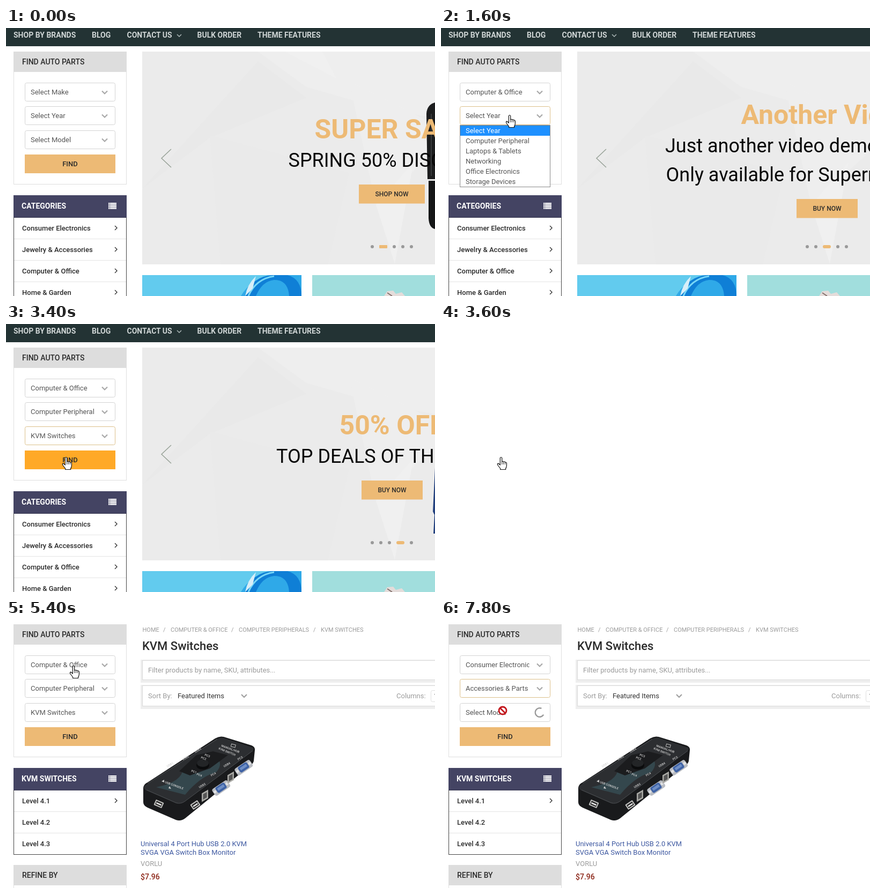
Recreate the animation shown at these times as an HTML page. Size 800x500 px, loop 8 s.

```html
<!DOCTYPE html>
<html lang="en">
<head>
<meta charset="utf-8">
<title>Parts finder</title>
<style>
html, body { margin: 0; width: 100%; height: 100%; overflow: hidden; background: #fff; }
svg { display: block; width: 800px; height: 500px; font-family: Roboto, Arial, sans-serif; }
text { white-space: pre; }
</style>
</head>
<body>
<svg id="stage" viewBox="0 0 800 500"></svg>
<script>
const ORANGE = '#edba75', DARK = '#2b2b2b', GREY = '#9b9b9b';
const FIELD_TOPS = [102, 146, 191];
const STEP = 200, LOOP = 8000;

const text = (x, y, str, size = 13, fill = DARK, weight = 400, extra = '') =>
  `<text x="${x}" y="${y}" font-size="${size}" fill="${fill}" font-weight="${weight}" ${extra}>${str.replace(/&/g, '&amp;')}</text>`;
const rect = (x, y, w, h, fill, extra = '') =>
  `<rect x="${x}" y="${y}" width="${w}" height="${h}" fill="${fill}" ${extra}/>`;
const line = (d, stroke, width = 1) =>
  `<path d="${d}" fill="none" stroke="${stroke}" stroke-width="${width}"/>`;
const shape = (d, fill, extra = '') => `<path d="${d}" fill="${fill}" ${extra}/>`;
const group = (transform, body) => `<g transform="${transform}">${body}</g>`;
const times = (n, fn) => Array.from({ length: n }, (_, i) => fn(i)).join('');

const CATEGORIES = ['Consumer Electronics', 'Jewelry & Accessories', 'Computer & Office', 'Home & Garden'];
const LISTS = {
  make: ['Select Make', ...CATEGORIES, 'Bags & Shoes', 'Toys & Hobbies', 'Sports & Outdoors', 'Health & Beauty'],
  office: ['Select Year', 'Computer Peripheral', 'Laptops & Tablets', 'Networking', 'Office Electronics', 'Storage Devices'],
  peripheral: ['Select Model', 'KVM Switches', 'Keyboards', 'Monitors'],
  consumer: ['Select Year', 'Accessories & Parts', 'Camera & Photo', 'Home Audio & Video', 'Portable Audio & Video',
    'Smart Electronics', 'Video Games', 'Earphones', 'Speakers']
};

// ---------- sidebar ----------
function finder(s) {
  const fields = times(3, i => {
    const y = FIELD_TOPS[i], label = s.values[i], spin = s.spin && s.spin[0] === i;
    const end = spin
      ? `<circle cx="184" cy="${y + 17.5}" r="8.3" fill="none" stroke="#999" stroke-width="2.4" stroke-dasharray="38 14.2" transform="rotate(${s.spin[1]} 184 ${y + 17.5})"/>`
      : line(`M179 ${y + 15.5}l5 5 5-5`, '#a8a8a8', 2.2);
    return rect(35.5, y + .5, 168, 34, '#fff', `rx="3" stroke="${s.focus === i ? '#dcc08a' : '#d3d3d3'}"`) +
      text(46, y + 22, label, 13, '#555', 400, 'clip-path="url(#field)"') + end;
  });
  return rect(14.5, 44.5, 210, 247, '#fff', 'stroke="#dedede"') +
    rect(14, 44, 211, 38, '#ddd') + text(30, 68, 'FIND AUTO PARTS', 14, DARK, 500) + fields +
    rect(35, 236, 169, 35, s.hover ? '#ffa927' : ORANGE) +
    text(119.5, 258, 'FIND', 13, DARK, 500, 'text-anchor="middle"');
}

function menu(title, items, arrows, height) {
  return rect(14.5, 312.5, 210, height, '#fff', 'stroke="#444"') +
    rect(14, 312, 211, 42, '#444463') + line('M14 353.5H225', '#36364f') +
    text(29, 337, title, 14, '#fff', 700) +
    times(4, i => rect(191, 326 + i * 3.1, 2.5, 2.4, '#fff') + rect(194, 326 + i * 3.1, 12, 2.4, '#fff')) +
    items.map((item, i) => {
      const y = 373 + i * 40;
      return (i ? line(`M15 ${y - 19.5}H224`, '#e4e4e4') : '') + text(30, y + 5, item, 13, DARK, 500) +
        (i < arrows ? line(`M203 ${y - 4}l4 4-4 4`, '#333', 1.4) : '');
    }).join('');
}

function dropdown({ field, list, pick }) {
  const items = LISTS[list], top = FIELD_TOPS[field] + 35, wide = list === 'consumer' ? 186 : 169;
  return rect(35.5, top + .5, wide - 1, items.length * 19 + 1, '#fff', 'stroke="#888"') +
    items.map((item, i) => {
      const y = top + 1 + i * 19;
      return (i === pick ? rect(36, y, wide - 2, 19, '#1e90ff') : '') +
        text(46, y + 14, item, 13, i === pick ? '#fff' : '#555');
    }).join('');
}

// ---------- home page ----------
const SLIDES = {
  1: {
    art: shape('M800 139Q785 143 784 160L786 282H800Z', '#1c1d1e') + shape('M800 285H788V355Q789 373 800 375Z', '#151617') +
      line('M793 160V276', '#3a3c3d', 2),
    lines: [[575.5, 206, 'SUPER SALE'], [526.5, 259, 'SPRING 50% DISCOUNT']],
    button: [658, 292, 123, 'SHOP NOW']
  },
  2: {
    art: '',
    lines: [[559.5, 179, 'Another Video'], [418, 232, 'Just another video demo'], [419.5, 286, 'Only available for Superm']],
    button: [663, 319, 114, 'BUY NOW']
  },
  3: {
    art: shape('M800 268L796 350 799 356 797 391H800Z', '#24427f'),
    lines: [[621.5, 206, '50% OFF'], [504, 259, 'TOP DEALS OF THE']],
    button: [663, 292, 114, 'BUY NOW']
  }
};

function banner(active) {
  const { art, lines, button: [bx, by, bw, label] } = SLIDES[active];
  const facets = shape('M470 44H800V168L700 150 560 110Z', '#eeeeee') +
    shape('M254 300L470 62 560 130 380 205Z', '#e9e9e9') +
    shape('M640 100L800 180V230L690 330Z', '#eeeeee') + shape('M690 330L760 250 725 440Z', '#f0f0f0') +
    shape('M380 200L640 270 600 441H400Z', '#eaeaea') +
    (active === 1 ? shape('M520 44H590L616 94Z', '#f0f0f0') : '');
  const dots = times(5, i => i === active
    ? rect(680 + 16 * i, 405, 15, 6, ORANGE, `rx="${active === 1 ? 1 : 3}"`)
    : `<circle cx="${(i < active ? 683 : 692) + 16 * i}" cy="408" r="3" fill="#999"/>`);
  return rect(254, 44, 546, 397, '#ebebeb') + facets + art +
    lines.map(([x, y, str], i) => text(x, y, str, i ? 36 : 50, i ? '#080808' : ORANGE, i ? 400 : 700)).join('') +
    rect(bx, by, bw, 35.5, ORANGE) +
    text(bx + bw / 2, by + 22, label, 12, DARK, 500, 'text-anchor="middle"') +
    dots + line('M308 226L290 243 308 260', '#98a298', 1.5);
}

const NAV = [[14, 'SHOP BY BRANDS'], [160, 'BLOG'], [225.5, 'CONTACT US'], [356.5, 'BULK ORDER'], [469, 'THEME FEATURES']];
const homeStatic =
  rect(0, 0, 800, 34, '#233334') + NAV.map(([x, str]) => text(x, 18, str, 14, '#cfd5d5', 700)).join('') +
  line('M319 12l4 4 4-4', '#aebaba', 1.5) +
  menu('CATEGORIES', CATEGORIES, 4, 220) +
  rect(254, 461, 297, 39, '#62cbee') +
  shape('M438 500Q458 466 500 461H551V500Z', '#2fa9e8') +
  shape('M446 500Q459 463 497 461H525Q551 468 551 500H528Q526 470 500 470 478 472 466 500Z', '#0f7fd6') +
  line('M452 500Q466 468 500 463', '#78d7f7', 3) + shape('M446 500Q450 478 466 463L460 486Z', '#d8eef8') +
  rect(571, 461, 229, 39, '#a1dedd') +
  shape('M705 500L711 491 722 490 727 496 738 493 744 500Z', '#e4dcda') + line('M711 494l9 6', '#84706c', 2);

// ---------- product page ----------
function port(x, y) {
  return group(`translate(${x} ${y}) rotate(-34)`,
    rect(-17, -7, 34, 15, '#b9bcc2', 'rx="4"') + rect(-10, -6, 20, 12, '#3e62a5', 'rx="3"') +
    rect(-7, -3, 14, 5, '#6f8fc6') +
    `<circle cx="-13.5" r="2.6" fill="#e2e3e5"/><circle cx="13.5" r="2.6" fill="#e2e3e5"/>`);
}
const usb = (x, y, angle) => group(`translate(${x} ${y}) rotate(${angle})`,
  rect(-8, -5.5, 16, 11, '#c2c2c0', 'rx="1"') + rect(-6, -3.5, 12, 7, '#262626') + rect(-5, -1, 10, 2.5, '#e8e8e8'));
const jack = (x, y) => group(`translate(${x} ${y}) skewY(-30)`,
  rect(-6, -8, 12, 16, '#a9a9a5') + rect(-3.5, -5, 7, 10, '#555'));
const tiny = (x, y, str, angle = 20) =>
  text(0, 0, str, 5.5, '#d4d4d4', 500, `transform="translate(${x} ${y}) rotate(${angle})"`);

const gadget =
  shape('M256 313Q257 306 264 303L390 221Q398 216 406 218L458 234Q465 237 464 243L462 263Q461 268 456 271L334 370Q326 376 317 373L264 350Q256 346 256 340Z', '#191a1c') +
  shape('M259 309L392 223Q399 218 406 220L460 238Q464 241 459 245L334 338Q326 344 317 342L262 318Q254 314 259 309Z', '#2c2e31') +
  shape('M280 312Q330 302 330 276 350 260 388 252 408 266 392 284 362 292 334 326Z', '#34474d') +
  shape('M323 282L355 252 386 245 414 252 380 277 343 290Z', '#1b1c1e') +
  line('M262 317L317 341Q326 344 334 338L460 244', '#4b4e51') +
  line('M264 305L394 222', '#505356') +
  '<ellipse cx="367" cy="271" rx="12" ry="8" fill="#0b0c0d"/><ellipse cx="367" cy="267" rx="11" ry="7" fill="#232527"/>' +
  tiny(401, 236, 'MANUAL/HUB') + tiny(396, 241, 'KVM SWITCH', 22) +
  rect(420, 232, 8, 5, 'none', 'stroke="#bbb" transform="rotate(15 424 234)"') +
  tiny(370, 253, 'PC3') + tiny(363, 258, 'PC2') + tiny(345, 283, 'PC1') + tiny(355, 289, 'PC4') +
  tiny(301, 275, 'USB1', -30) + tiny(330, 262, 'USB2', -30) + tiny(353, 248, 'USB3', -30) +
  tiny(296, 304, 'USB CONSOLE', 20) + shape('M290 301l5-3v5Z', '#ccc') + shape('M303 314l5 1-3-5Z', '#ccc') +
  tiny(383, 292, 'PC4', -30) + tiny(407, 275, 'USB4', -30) + tiny(433, 262, 'PC3', -30) + tiny(361, 314, 'USB3', -30) +
  jack(371, 328) + port(401, 313) + jack(419, 294) + port(443, 275) + usb(353, 345, -34) + usb(285, 343, 24);

const panel = (y, h) => rect(251, y - 1, 549, h + 6, '#eeeeee') + rect(254.5, y + .5, 550, h - 1, '#fff', 'stroke="#d9d9d9"');
const CRUMBS = [[254.5, 'HOME'], [293, '/'], [307, 'COMPUTER & OFFICE'], [420, '/'], [434, 'COMPUTER PERIPHERALS'], [573, '/'], [587, 'KVM SWITCHES']];
const productStatic =
  CRUMBS.map(([x, str]) => text(x, 22, str, 11, GREY)).join('') +
  text(254, 56, 'KVM Switches', 22, DARK, 500) +
  panel(75, 37) + text(265, 98, 'Filter products by name, SKU, attributes...', 13, GREY) +
  panel(122, 39) + text(265, 146, 'Sort By:', 13, GREY) + text(320, 146, 'Featured Items', 13, '#333') +
  line('M439 139l5 5 5-5', '#a0a0a0', 2.2) + text(728, 146, 'Columns:', 13, GREY) +
  rect(792.5, 131.5, 40, 21, '#fff', 'rx="3" stroke="#e0e0e0"') + text(798, 146, '1', 13, '#333') +
  gadget +
  text(251, 422, 'Universal 4 Port Hub USB 2.0 KVM', 13, '#3c57a0') +
  text(251, 438, 'SVGA VGA Switch Box Monitor', 13, '#3c57a0') +
  text(251, 459, 'VORLU', 13, GREY) + text(251, 484, '$7.96', 14, '#8c2618', 500) +
  rect(14.5, 457.5, 210, 60, '#fff', 'stroke="#dedede"') + rect(14, 457, 211, 38, '#ddd') +
  text(30, 481, 'REFINE BY', 14, DARK, 500) +
  group('translate(0 -36)', menu('KVM SWITCHES', ['Level 4.1', 'Level 4.2', 'Level 4.3'], 1, 161));

// ---------- cursors, with the hot spot at 0,0 ----------
const outline = 'stroke="#111" stroke-width="1.2" stroke-linejoin="round"';
const CURSORS = {
  hand: shape('M-1.7 2Q0-1 1.7 2V9Q3.2 7.4 4.6 9.2 6.4 8 7.6 10 9.4 9.4 10.4 11.5V16Q10 20 8.6 21.5V23.5H-1.4V21.5L-6 15.5Q-7.6 12-4.8 12.2L-1.7 15Z', '#fff', outline) +
    line('M1.7 9V14M4.6 9.5V14M7.6 10.5V14', '#111', .9),
  arrow: shape('M0 0V16L4 12.5 6.5 18 9 17 6.5 11.5H11.5Z', '#fff', outline),
  blocked: '<circle r="7" fill="#fff" stroke="#c3161c" stroke-width="2.8"/>' + line('M-5-5L5 5', '#c3161c', 2.8)
};

// ---------- timeline: each entry changes the state from its time on ----------
const MAKE = 'Select Make', YEAR = 'Select Year', MODEL = 'Select Model';
const OFFICE = CATEGORIES[2], PERIPHERAL = 'Computer Peripheral', KVM = 'KVM Switches';
const open = (field, list, pick) => ({ field, list, pick });
const TIMELINE = [
  [0, { page: 'home', slide: 1, values: [MAKE, YEAR, MODEL], focus: -1, cursor: null }],
  [200, { cursor: ['hand', 128, 118] }],
  [400, { focus: 0, list: open(0, 'make', 0) }],
  [600, { list: open(0, 'make', 3), cursor: ['arrow', 126, 203] }],
  [800, { list: null, values: [OFFICE, YEAR, MODEL], spin: [1, -162], cursor: ['hand', 131, 201] }],
  [1000, { spin: [1, -90] }],
  [1200, { spin: null, slide: 2, cursor: ['hand', 131, 184] }],
  [1400, { cursor: ['hand', 128, 162] }],
  [1600, { focus: 1, list: open(1, 'office', 0) }],
  [1800, { list: open(1, 'office', 1), cursor: ['arrow', 127, 206] }],
  [2200, { list: null, values: [OFFICE, PERIPHERAL, MODEL], spin: [2, -12], cursor: ['blocked', 127, 209] }],
  [2400, { spin: [2, 60] }],
  [2600, { spin: null, cursor: ['hand', 127, 207] }],
  [2800, { focus: 2, list: open(2, 'peripheral', 0) }],
  [3000, { slide: 3, list: open(2, 'peripheral', 1), cursor: ['arrow', 118, 252] }],
  [3200, { list: null, values: [OFFICE, PERIPHERAL, KVM], hover: true, cursor: ['hand', 112, 248] }],
  [3600, { page: 'blank', hover: false, focus: -1 }],
  [3800, { page: 'product', values: [MAKE, YEAR, MODEL] }],
  [4000, { values: [OFFICE, YEAR, MODEL], spin: [1, -12] }],
  [4200, { spin: [1, 60] }],
  [4400, { spin: [1, 132] }],
  [4600, { values: [OFFICE, PERIPHERAL, MODEL], spin: [2, 0] }],
  [4800, { spin: [2, 72] }],
  [5000, { values: [OFFICE, PERIPHERAL, KVM], spin: null, cursor: ['hand', 115, 210] }],
  [5200, { cursor: ['hand', 123, 128] }],
  [5400, { cursor: ['hand', 126, 85] }],
  [5600, { focus: 0, list: open(0, 'make', 3) }],
  [5800, { list: open(0, 'make', 2), cursor: ['arrow', 122, 149] }],
  [6000, { list: open(0, 'make', 1), cursor: ['arrow', 120, 130] }],
  [6400, { list: null, values: [CATEGORIES[0], YEAR, MODEL], spin: [1, 30], cursor: ['blocked', 120, 130] }],
  [6600, { spin: null, cursor: ['hand', 118, 128] }],
  [6800, { focus: 1, list: open(1, 'consumer', 0) }],
  [7000, { list: open(1, 'consumer', 1), cursor: ['arrow', 115, 169] }],
  [7400, { list: null, values: [CATEGORIES[0], 'Accessories & Parts', MODEL], spin: [2, -114], cursor: ['blocked', 115, 169] }],
  [7600, { spin: [2, -42] }],
  [7800, { spin: [2, 30] }]
];

const stateAt = t => Object.assign({}, ...TIMELINE.filter(([start]) => start <= t).map(([, patch]) => patch));

function draw(s) {
  const home = s.page === 'home';
  const side = finder(s) + (s.list ? dropdown(s.list) : '');
  const body = home ? homeStatic + banner(s.slide) + side
    : s.page === 'product' ? productStatic + group('translate(0 -36)', side) : '';
  const pointer = s.cursor ? group(`translate(${s.cursor[1]} ${s.cursor[2]})`, CURSORS[s.cursor[0]]) : '';
  document.getElementById('stage').innerHTML =
    '<defs><clipPath id="field"><rect x="40" y="0" width="124.5" height="500"/></clipPath></defs>' +
    rect(0, 0, 800, 500, '#fff') + body + pointer;
}

let shown = -1;
const began = performance.now();
function tick() {
  const step = Math.floor(((performance.now() - began) % LOOP) / STEP);
  if (step !== shown) draw(stateAt((shown = step) * STEP));
  requestAnimationFrame(tick);
}
tick();
</script>
</body>
</html>
```
